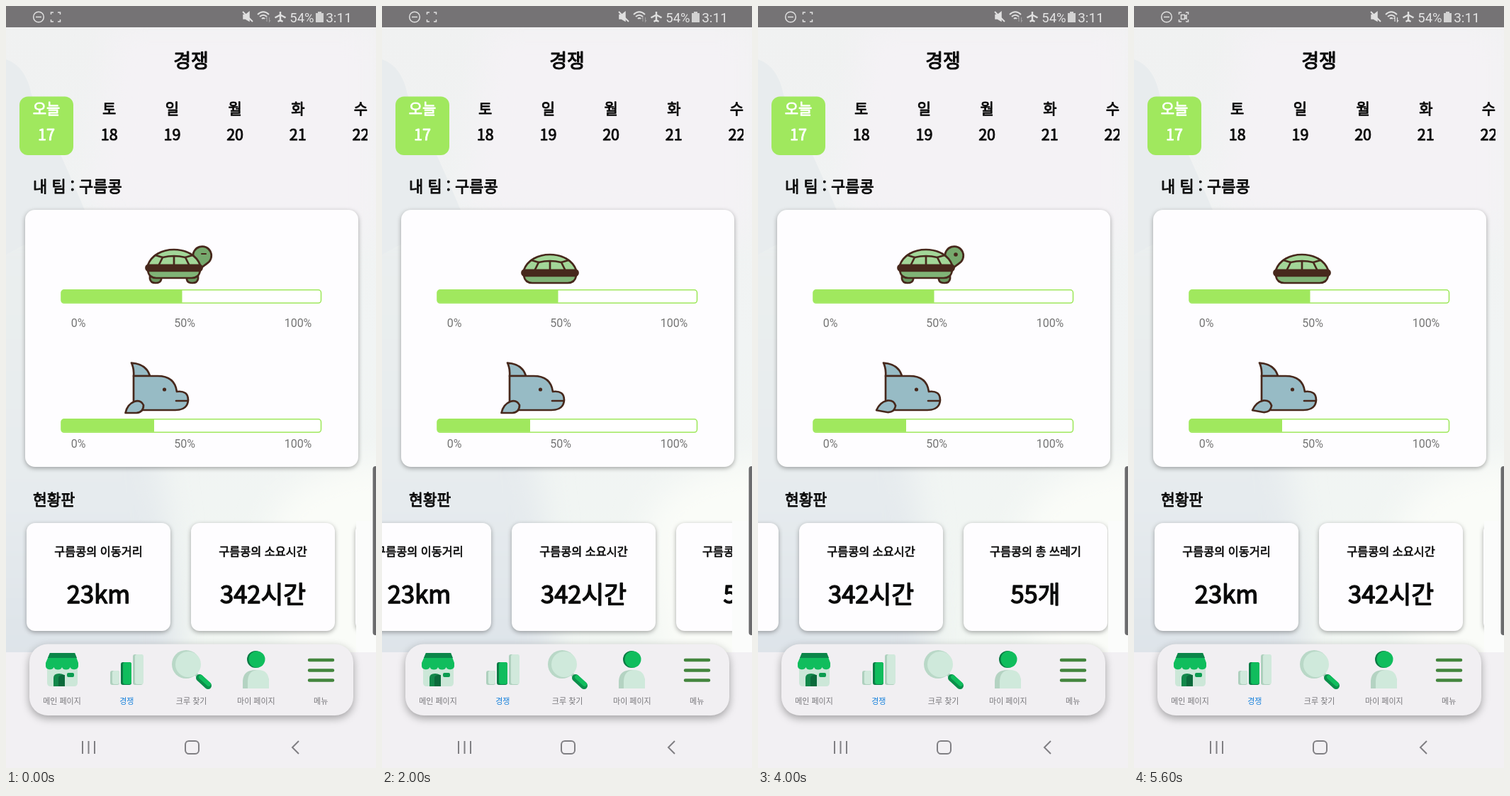
Write an HTML page that moves like this. It is 522x1073 px and loops after 5.7 s.

```html
<!DOCTYPE html>
<html lang="ko">
<head>
<meta charset="utf-8">
<style>
  html, body { margin: 0; width: 100%; height: 100%; overflow: hidden; background: #f2f0f3; }
  svg { display: block; }
  text { font-family: "Noto Sans CJK KR", "Noto Sans CJK", sans-serif; stroke-width: .042em; stroke-linejoin: round; text-anchor: middle; }
  .roboto { font-family: Roboto, sans-serif; stroke: none; }
  .left { text-anchor: start; }
  .thin { stroke: none; }
  .card { fill: #fefdff; filter: drop-shadow(0 2px 3px #0005); }
  .animal { stroke: #47281c; stroke-width: 2.7; stroke-linejoin: round; stroke-linecap: round; }
  .line { fill: none; }
  .dot { fill: #47281c; stroke: none; }
</style>
</head>
<body>
<svg id="stage" width="522" height="1073" viewBox="0 0 522 1073">
  <defs>
    <linearGradient id="sky" x2="0" y2="1">
      <stop stop-color="#f0f1f1"/><stop offset=".5" stop-color="#f1f4f4"/><stop offset="1" stop-color="#f1f6f2"/>
    </linearGradient>
    <linearGradient id="mist" x2="0" y2="1">
      <stop stop-color="#ebefef"/><stop offset=".6" stop-color="#e6ebee"/><stop offset="1" stop-color="#dce2e8"/>
    </linearGradient>
    <filter id="soft" x="-30%" y="-30%" width="160%" height="160%"><feGaussianBlur stdDeviation="22"/></filter>
    <clipPath id="photo"><path d="M0 30H522V910H0Z"/></clipPath>
    <clipPath id="days"><path d="M0 120H510V215H0Z"/></clipPath>
    <clipPath id="list"><path d="M0 715H494V900H0Z"/></clipPath>
  </defs>

  <g clip-path="url(#photo)">
    <path d="M0 30H522V910H0Z" fill="url(#sky)"/>
    <path d="M150 30H522V330L120 290Z" fill="#f4f2f5" filter="url(#soft)"/>
    <path d="M-60 300H120Q250 640 240 960H-60Z" fill="url(#mist)" filter="url(#soft)"/>
    <path d="M0 75Q28 85 36 125Q70 190 112 290L0 350Z" fill="#e8ecee"/>
    <path d="M370 740Q390 650 560 640V940H400Z" fill="#fafcf8" filter="url(#soft)"/>
    <path d="M494 725H522V910H494Z" fill="#fbfcfb"/>
  </g>

  <path d="M0 0H522V30H0Z" fill="#757375"/>
  <g fill="none" stroke="#e0e0e0" stroke-width="1.5">
    <circle cx="46" cy="15.500" r="7.300"/><path d="M42 15.500H50"/>
    <path d="M63.500 12V9H67M73 9H76.500V12M76.500 19V22H73M67 22H63.500V19"/>
    <path id="camera" d="M66.500 12.500H71.500V18.500H66.500ZM71.500 15L74 13V18L71.500 16"/>
    <path d="M335 12.500H338L343 8.500V21L338 18H335Z" fill="#e0e0e0"/><path d="M334 8L348 22" stroke-width="2"/>
    <path d="M355 12Q363 4.500 371 12M358 15Q363 10.500 368 15M361 18Q363 16 365 18" stroke-width="2"/>
    <path id="traffic" d="M368 22V16L366.500 18M371.500 16V22L373 20" stroke-width="1.200"/>
    <path d="M387 8V22M379.500 16.500L387 12.500L394.500 16.500M383.500 22L387 20L390.500 22" stroke-width="2.400"/>
  </g>
  <path d="M440 8H445V10H448V23H437V10H440Z" fill="#d2d2d2"/>

  <rect x="19" y="127.500" width="76" height="82.500" rx="12" fill="#a0e85e"/>
  <g id="calendar" clip-path="url(#days)"></g>
  <rect class="card" x="27" y="287" width="470" height="362" rx="14"/>
  <g id="bars"></g>

  <g class="animal">
    <g id="head">
      <path d="M262 366Q266 360 264 354A13 13 0 1 1 283 363Q278 366 274 371Z" fill="#76a96d"/>
      <circle id="eyeOpen" class="dot" cx="279" cy="350" r="2.800"/>
      <path id="eyeShut" class="line" stroke-width="2" d="M276 349H282"/>
    </g>
    <g id="feet" fill="#68975f">
      <path d="M203 378H219V385Q218 390 211 390T203 384Z"/>
      <path d="M255 378H271V384Q270 390 263 390T255 385Z"/>
    </g>
    <g id="shell">
      <path d="M200 373H274Q272 383 262 383H212Q202 383 200 373Z" fill="#80b477"/>
      <path d="M200 365C205 351 220 343 237 343S269 351 274 365Z" fill="#a2d698"/>
      <path class="line" d="M211 351L221 354Q237 350 253 354L263 351M221 354L216 364M253 354L258 364M237 352V364"/>
      <rect x="197.500" y="365" width="79" height="7.500" rx="3.500" fill="#47281c"/>
    </g>
  </g>

  <g id="dolphin" class="animal" fill="#97bbc5">
    <path d="M177 502.500Q198 504 203 521H180Q181 511 177 502.500Z"/>
    <path d="M180 521H214Q238 521 241 543Q257 541 257 555Q256 569 239 569H180Z"/>
    <path class="line" d="M240 556H256"/>
    <ellipse id="dolphinEye" class="dot" cx="223.500" cy="540" rx="2.600" ry="2.600"/>
    <path id="fin" d="M168.500 573Q171 561 181 557Q190 554 194 562Q194 572 184 573Z"/>
  </g>

  <g clip-path="url(#list)"><g id="cards"></g></g>
  <rect x="517.500" y="648" width="12" height="238" rx="4" fill="#6a6a6c"/>

  <rect x="33" y="898.500" width="457" height="100.500" rx="26" fill="#f1eff2" style="filter:drop-shadow(0 4px 6px #0005)"/>
  <g id="icons">
    <path d="M58 930H101V953Q101 958 96 958H63Q58 958 58 953Z" fill="#cce7d8"/>
    <path d="M67 958V946Q67 940 75 940T83 946V958Z" fill="#12884a"/>
    <path d="M74 958V946Q75 941 83 942V958Z" fill="#0b6a3b"/>
    <rect x="86" y="939" width="10" height="6" rx="2" fill="#0b9c50"/>
    <path d="M62 911H97L102 925V930A6 5 0 0 1 90.500 931A6 5 0 0 1 79 931A6 5 0 0 1 67.500 931A6 5 0 0 1 56 930V925Z" fill="#10bd5d"/>
    <path d="M62 911H97L100 918H59Z" fill="#0b8549"/>
    <g fill="#aed0be"><rect x="147" y="936" width="13" height="20" rx="3"/><rect x="179" y="913" width="14" height="43" rx="3"/></g>
    <g fill="#d1e9dc"><rect x="150" y="936" width="10" height="19" rx="3"/><rect x="182" y="913" width="12" height="42" rx="3"/></g>
    <rect x="162" y="924" width="15" height="32" rx="3" fill="#0b7b45"/><rect x="165" y="924" width="12" height="31" rx="3" fill="#10bd5d"/>
    <path d="M266 939L273 946" stroke="#aed0be" stroke-width="5"/>
    <circle cx="254" cy="927" r="20" fill="#b9d8c7"/><circle cx="257" cy="927" r="18" fill="#cfe9db"/>
    <path d="M273 946L285 957" stroke="#0b8f4b" stroke-width="10" stroke-linecap="round"/>
    <path d="M275 945L286 955" stroke="#10bd5d" stroke-width="6" stroke-linecap="round"/>
    <circle cx="352" cy="920" r="12" fill="#0b7b45"/><circle cx="354" cy="920" r="11.500" fill="#10bd5d"/>
    <path d="M334 961V950Q335 935 352 935T371 950V961Z" fill="#b4d3c2"/>
    <path d="M341 961V950Q342 935 356 935T371 950V961Z" fill="#cfe9db"/>
    <path d="M428 921H461M428 935.500H461M428 949.500H461" stroke="#43853d" stroke-width="4.500" stroke-linecap="round"/>
  </g>

  <g fill="none" stroke="#807f83" stroke-width="2">
    <path d="M108 1035V1053M116.500 1035V1053M125 1035V1053"/>
    <rect x="253" y="1035" width="19" height="18" rx="5"/>
    <path d="M413 1035L404 1044L413 1053"/>
  </g>
  <g id="labels"></g>
</svg>
<script>
const $ = id => document.getElementById(id);
const team = "구름콩";

// y is the middle of the line of text; the outline in the fill colour thickens it
const label = (x, y, size, str, fill = "#0b0b0b", cls = "") =>
  `<text x="${x}" y="${y + size * 0.37}" font-size="${size}" fill="${fill}" stroke="${fill}" class="${cls}">${str}</text>`;

$("calendar").innerHTML = ["오늘", "토", "일", "월", "화", "수"].map((day, i) => {
  const x = 57 + i * 88.7, fill = i ? "#0b0b0b" : "#fff";
  return label(x, 144, 21, day, fill) + label(x, 181, 21.5, 17 + i, fill);
}).join("");

const bar = (y, end, textY) => `
  <rect x="78" y="${y}" width="366.500" height="18.500" rx="4" fill="#fff" stroke="#a0e85e" stroke-width="1.600"/>
  <path d="M${end} ${y}H82Q78 ${y} 78 ${y + 4}V${y + 14}Q78 ${y + 18} 82 ${y + 18}H${end}Z" fill="#a0e85e"/>` +
  [[102, 0], [252, 50], [412, 100]].map(([x, n]) => label(x, textY, 16, n + "%", "#747474", "roboto")).join("");
$("bars").innerHTML = bar(399.8, 248.5, 446) + bar(581.8, 209, 616);

$("cards").innerHTML = [["이동거리", "23km"], ["소요시간", "342시간"], ["총 쓰레기", "55개"]].map(([title, value], i) => {
  const x = 29 + i * 232;
  return `<rect class="card" x="${x}" y="728" width="203" height="152" rx="12"/>` +
    label(x + 101.5, 768, 16.3, `${team}의 ${title}`) + label(x + 101.5, 828, 34.5, value);
}).join("");

$("labels").innerHTML =
  label(261, 77, 27, "경쟁") +
  label(38, 254, 22, `내 팀 : ${team}`, undefined, "left") +
  label(38, 695, 21.5, "현황판", undefined, "left") +
  label(417.5, 16, 18.5, "54%", "#e4e4e4", "roboto") +
  label(469.5, 16, 19, "3:11", "#e4e4e4", "roboto") +
  ["메인 페이지", "경쟁", "크루 찾기", "마이 페이지", "메뉴"].map((name, i) =>
    label(79 + i * 91.3, 979, 11, name, i == 1 ? "#1a83dc" : "#77767a", "thin")).join("");

// keys: [time, value, ...]; returns the interpolated values
function at(keys, t) {
  const i = keys.findIndex(k => k[0] > t);
  if (i == 0) return keys[0].slice(1);
  if (i < 0) return keys[keys.length - 1].slice(1);
  const a = keys[i - 1], b = keys[i], f = (t - a[0]) / (b[0] - a[0]);
  return a.slice(1).map((v, j) => v + (b[j + 1] - v) * f);
}

const scrollKeys = [[1800, 0], [1900, 30], [2000, 78], [2200, 150], [2400, 192], [2600, 203],
  [4100, 203], [4200, 199], [4400, 181], [4700, 140], [5000, 62], [5200, 18], [5400, 0]];
const hideKeys = [[1150, 0], [1400, 1], [2200, 1], [2500, 0]];
const leapKeys = [[700, 0, 0], [900, -7, -2], [1100, 0, -14], [1300, 7, -10.5], [1500, 5.5, 0], [1650, 0, 0]];

const move = (id, value) => $(id).setAttribute("transform", value);
const show = (id, on) => $(id).setAttribute("opacity", on ? 1 : 0);

function draw(t) {
  move("cards", `translate(${-at(scrollKeys, t)[0]})`);
  show("camera", t % 1000 >= 400);
  $("traffic").setAttribute("opacity", t >= 4300 ? 1 : 0.4);

  const [hide] = at(hideKeys, t % 3800);
  const step = (1 - Math.cos(t / 400 * 2 * Math.PI)) / 2;
  const blink = t % 3800 < 150;
  move("shell", `translate(0 ${7 * hide})`);
  move("head", `translate(${-36 * hide} ${step + 13 * hide})`);
  move("feet", `translate(0 ${-1.5 * step * (1 - hide) - 6 * hide})`);
  show("feet", hide < 1);
  show("head", hide < 1);
  show("eyeOpen", !blink);
  show("eyeShut", blink);

  const phase = t % 1900, flap = phase % 380 / 380;
  const [tilt, rise] = at(leapKeys, phase);
  move("dolphin", `translate(0 ${rise}) rotate(${tilt} 214 545)`);
  move("fin", `rotate(${flap > 0.4 && flap < 0.8 ? 10 : 0} 189 563)`);
  $("dolphinEye").setAttribute("ry", phase > 850 && phase < 1000 ? 1.6 : 2.6);
}

// The picture is held for 100 ms; the margin absorbs display refresh delay.
const start = performance.now();
function frame() {
  const t = performance.now() - start + 17;
  draw(Math.floor(t / 100) * 100 % 5700);
  requestAnimationFrame(frame);
}
frame();
</script>
</body>
</html>
```
